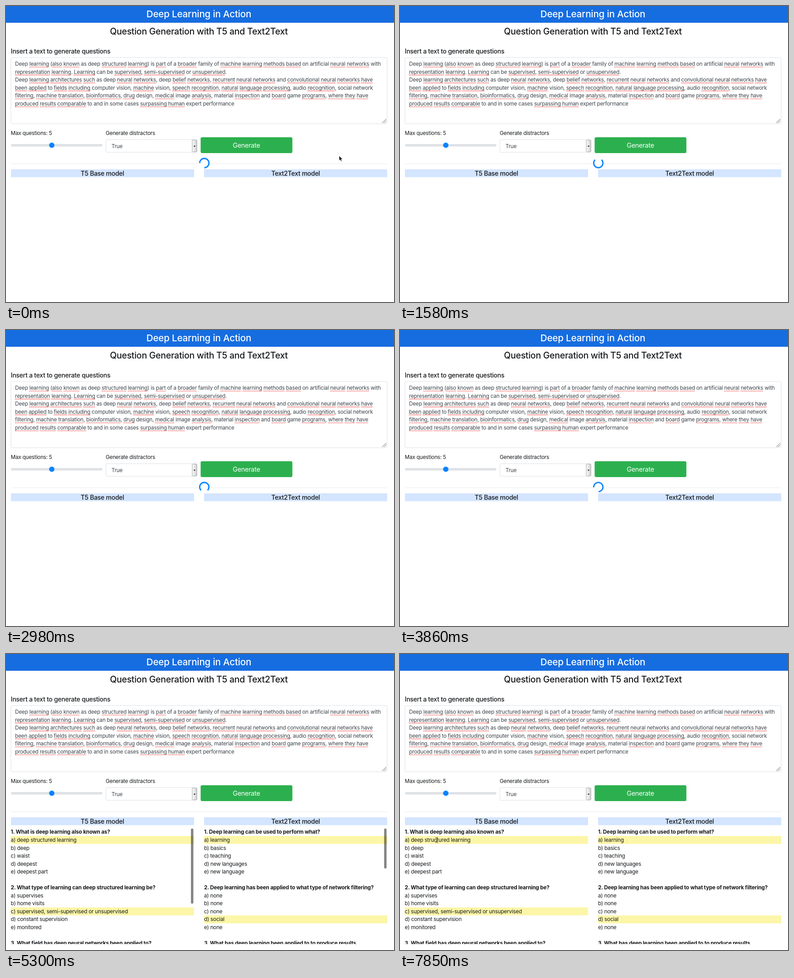
Animation, 856 px wide and 654 px high, one loop 8 s. Source, as an HTML page:

```html
<!DOCTYPE html>
<html lang="en">
<head>
<meta charset="utf-8">
<title>Question generation</title>
<style>
  html, body { margin: 0; width: 100%; height: 100%; overflow: hidden; background: #fff; }
  svg { display: block; width: 856px; height: 654px; }
  text { font-family: Inter, "Open Sans", sans-serif; font-size: 11.7px; letter-spacing: -.2px; fill: #16191c; white-space: pre; }
  .mid { text-anchor: middle; }
  .brand { font-size: 20.5px; letter-spacing: -.14px; font-weight: 500; fill: #fff; }
  .title { font-size: 19.5px; letter-spacing: -.27px; font-weight: 500; }
  .sub { font-size: 14px; letter-spacing: -.26px; font-weight: 500; }
  .btn { font-size: 14.4px; letter-spacing: -.25px; fill: #fff; }
  .field { fill: #3d444b; }
  .ask { font-weight: 700; letter-spacing: -.17px; }
  .spell { stroke: #f4302a; stroke-width: 1.4; stroke-dasharray: 1.5 1; }
</style>
</head>
<body>
<svg id="stage" viewBox="0 0 856 654">
  <defs>
    <clipPath id="pane"><rect x="0" y="380" width="856" height="261"/></clipPath>
    <linearGradient id="knob" x2="1" y2="0">
      <stop stop-color="#fafafa"/><stop offset="1" stop-color="#d2d2d2"/>
    </linearGradient>
  </defs>
  <rect width="856" height="37" fill="#166de0"/>
  <g fill="#fff" stroke="#d3d8dd" stroke-width=".8">
    <rect x="10.9" y="113.9" width="830" height="146.2" rx="2.5"/>
    <rect x="220.4" y="295.4" width="201" height="27.8" rx="2.5"/>
  </g>
  <path d="M830 258.5L839 249.5M834 258.5L839 253.5" stroke="#555" fill="none"/>
  <rect x="10.9" y="305" width="202" height="5.6" rx="2.8" fill="#dfe2e6"/>
  <circle cx="101" cy="307.7" r="5.9" fill="#0a84ff"/>
  <rect x="410.8" y="296.2" width="10.2" height="26" rx="1" fill="url(#knob)" stroke="#999" stroke-width=".8"/>
  <path d="M413.6 308.8h4.6l-2.3 2.8z" fill="#111"/>
  <rect x="429.4" y="290" width="202.4" height="35" rx="3.3" fill="#2cb04f"/>
  <path d="M11 348.6H841" stroke="#e8e8e8" stroke-width=".9"/>
  <path d="M11 360.8H415V378.2H11zM437 360.8H841V378.2H437z" fill="#d4e5ff"/>
  <g id="page"></g>
  <g id="results" clip-path="url(#pane)"></g>
  <g id="bars" fill="#000" fill-opacity=".48">
    <rect x="408" y="385.6" width="5.4" height="166" rx="2.7"/>
    <rect x="834.2" y="385.6" width="5.4" height="88.4" rx="2.7"/>
  </g>
  <g id="wait">
    <rect x="425" y="335" width="25" height="24" fill="#fff"/>
    <path id="ring" d="M7.21 7.21A10.2 10.2 0 1 1 7.21 -7.21" fill="none" stroke="#0a84ff" stroke-width="2.9"/>
  </g>
  <path id="arrow" d="M0 0V10.6L2.4 8.4L4.2 12.3L6 11.5L4.3 7.7H7.6Z" fill="#000" stroke="#fff" stroke-width=".8"/>
  <path id="beam" d="M-2.8 -6Q0 -6 0 -4.2Q0 -6 2.8 -6M0 -4.2V4.2M-2.8 6Q0 6 0 4.2Q0 6 2.8 6M-1.5 1.8H1.5" fill="none" stroke="#333" stroke-width=".9"/>
</svg>
<script>
const LOOP = 8000, STEP = 80, PITCH = 17.55, RESULTS_AT = 5220;
const $ = id => document.getElementById(id);

function add(parent, tag, attrs, content) {
  const el = document.createElementNS("http://www.w3.org/2000/svg", tag);
  for (const k in attrs) el.setAttribute(k, attrs[k]);
  if (content) el.textContent = content;
  return parent.appendChild(el);
}
const label = (x, y, s, cls = "") => add($("page"), "text", { x, y, class: cls }, s);

label(425.5, 24.6, "Deep Learning in Action", "brand mid");
label(425.5, 63, "Question Generation with T5 and Text2Text", "title mid");
label(10.6, 104.8, "Insert a text to generate questions", "sub");
label(10.6, 285.4, "Max questions: 5");
label(220, 285.4, "Generate distractors");
label(232.8, 314.2, "True", "field");
label(530.4, 313.2, "Generate", "btn mid");
label(212.6, 375, "T5 Base model", "sub mid");
label(639, 375, "Text2Text model", "sub mid");

// A leading ~ marks a word underlined by the spell checker.
const passage = [
  "Deep ~learning (~also ~known as deep ~structured ~learning) is ~part of a ~broader family of ~machine ~learning ~methods ~based on artificial ~neural ~networks with",
  "~representation ~learning. ~Learning can be ~supervised, ~semi-supervised or ~unsupervised.",
  "Deep ~learning ~architectures ~such as deep ~neural ~networks, deep ~belief ~networks, ~recurrent ~neural ~networks and ~convolutional ~neural ~networks ~have",
  "~been ~applied to ~fields ~including computer vision, ~machine vision, ~speech ~recognition, ~natural ~language ~processing, audio ~recognition, social network",
  "~filtering, ~machine ~translation, ~bioinformatics, ~drug design, ~medical image ~analysis, material ~inspection and ~board game ~programs, ~where ~they ~have",
  "~produced ~results ~comparable to and in some cases ~surpassing ~human expert performance"
];
passage.forEach((line, i) => {
  const y = 132.2 + i * PITCH;
  const el = label(20, y, line.replaceAll("~", ""), "field");
  let marks = 0;
  for (const m of line.matchAll(/~([\w-]+)/g)) {
    const from = m.index - marks++;
    const x1 = el.getStartPositionOfChar(from).x;
    const x2 = el.getEndPositionOfChar(from + m[1].length - 1).x;
    add($("page"), "path", { d: `M${x1} ${y + 2.7}H${x2}`, class: "spell" });
  }
});

// A leading * marks the correct answer.
const quizzes = [[10.6, [
  "1. What is deep learning also known as?",
  "*a) deep structured learning", "b) deep", "c) waist", "d) deepest", "e) deepest part", "",
  "2. What type of learning can deep structured learning be?",
  "a) supervises", "b) home visits", "*c) supervised, semi-supervised or unsupervised",
  "d) constant supervision", "e) monitored", "",
  "3. What field has deep neural networks been applied to?"
]], [437, [
  "1. Deep learning can be used to perform what?",
  "*a) learning", "b) basics", "c) teaching", "d) new languages", "e) new language", "",
  "2. Deep learning has been applied to what type of network filtering?",
  "a) none", "b) none", "c) none", "*d) social", "e) none", "",
  "3. What has deep learning been applied to to produce results"
]]];
for (const [x, rows] of quizzes) rows.forEach((row, i) => {
  const y = 397.4 + i * PITCH;
  if (row[0] === "*")
    add($("results"), "rect", { x, y: y - 12.9, width: 404.2, height: PITCH, fill: "#fcf6a8" });
  add($("results"), "text", { x, y, class: /^\d/.test(row) ? "ask" : "" }, row.replace("*", ""));
});

const clamp = v => Math.min(1, Math.max(0, v));
const smooth = p => p * p * (3 - 2 * p);
const easeOut = p => 1 - (1 - p) ** 2;

function along(points, t) {
  let i = 1;
  while (i < points.length - 1 && t > points[i][0]) i++;
  const a = points[i - 1], b = points[i], p = clamp((t - a[0]) / (b[0] - a[0]));
  return a.slice(1).map((v, k) => v + (b[k + 1] - v) * p);
}

// Bursts of the spinner: start and number of steps before it holds.
const bursts = [[0, 11], [940, 10], [1860, 10], [2740, 5], [3380, 10], [4260, 10], [5140, 1]];
const turns = [[0, 135], [1580, 990], [2980, 1530], [4660, 2295], [5220, 2553]];
function spinAngle(t) {
  const [start, n] = bursts.filter(b => b[0] <= t).pop();
  return along(turns, start + Math.min(Math.floor((t - start) / STEP), n) * STEP)[0];
}

// Pointer moves: start, steps, easing, path over 0..1.
const moves = [
  { at: 0, n: 7, ease: smooth, path: [[0, 735, 331], [1, 778, 662]] },
  { at: 6310, n: 4, ease: easeOut, path: [[0, 771, 642], [1, 368, 404]] },
  { at: 6720, n: 4, ease: p => p, path: [[0, 368, 404], [.5, 290, 372], [.75, 262, 356], [1, 251, 368]] },
  { at: 7210, n: 8, ease: smooth, path: [[0, 251, 368], [1, 81, 411]] }
];
function pointer(t) {
  const m = moves.filter(m => m.at <= t).pop();
  return along(m.path, m.ease(clamp(Math.floor((t - m.at) / STEP) / m.n)));
}

const show = (id, on) => $(id).setAttribute("visibility", on ? "visible" : "hidden");
const place = (id, x, y, r = 0) => $(id).setAttribute("transform", `translate(${x} ${y}) rotate(${r})`);

function draw(t) {
  const done = t >= RESULTS_AT;
  show("wait", !done);
  show("results", done);
  if (!done) place("ring", 437.5, 347, spinAngle(t));
  const fade = !done || t >= 5720 ? 0 : t < 5300 || t >= 5640 ? .5 : 1;
  $("bars").setAttribute("opacity", fade);

  const [x, y] = pointer(t), typing = t >= 7040;
  show("arrow", !typing);
  show("beam", typing);
  place(typing ? "beam" : "arrow", x, y);
}

const begin = performance.now();
function tick() {
  draw((performance.now() - begin) % LOOP);
  requestAnimationFrame(tick);
}
tick();
</script>
</body>
</html>
```
